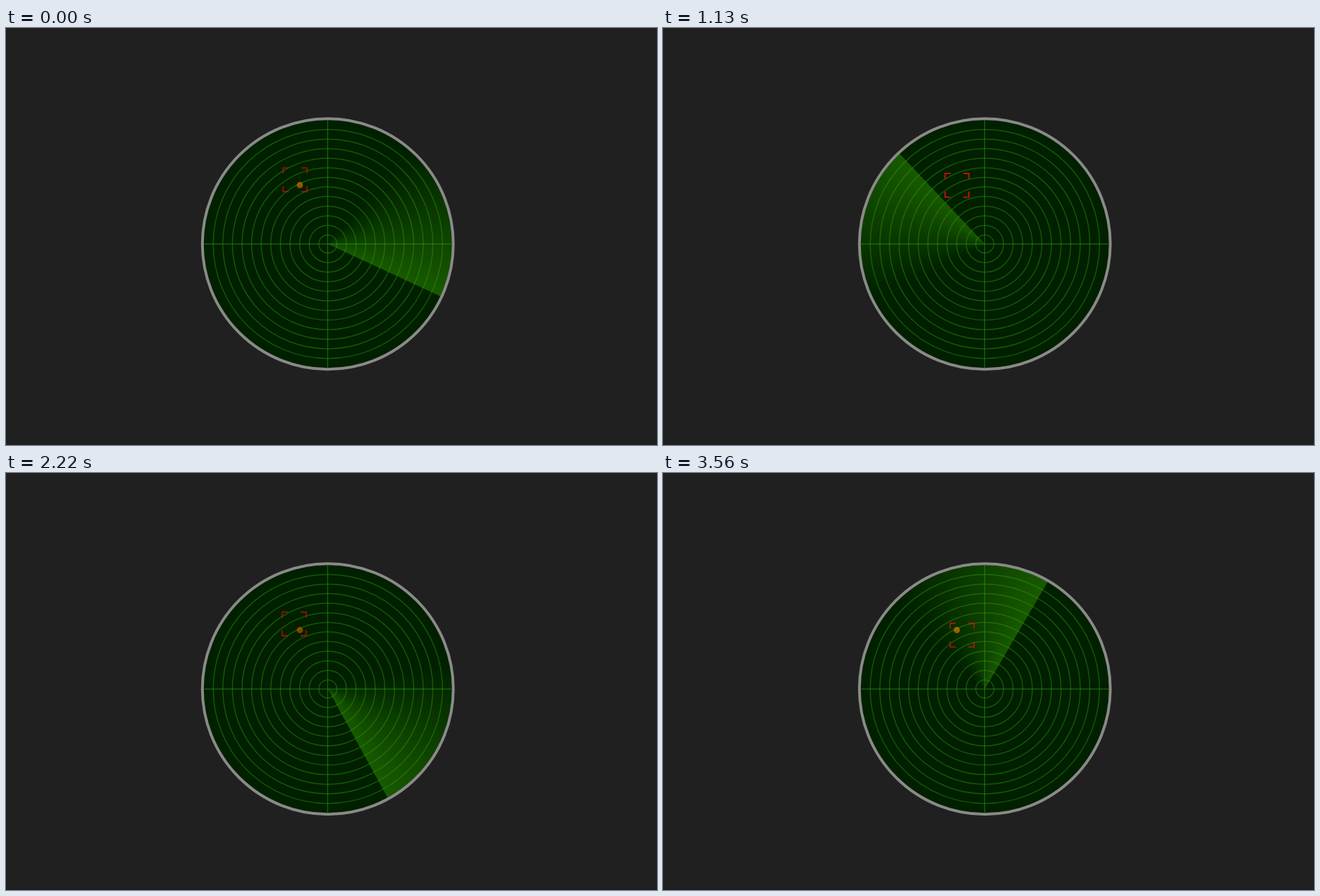
An HTML page with a canvas for the animation above (3.61 s loop, 934 by 599 pixels).

```html
<!DOCTYPE html>
<html lang="en">
<head>
<meta charset="utf-8">
<title>Radar</title>
<style>
  html, body { margin: 0; width: 100%; height: 100%; overflow: hidden; background: #202020; }
  canvas { display: block; }
</style>
</head>
<body>
<canvas id="stage" width="934" height="599"></canvas>
<script>
const ctx = document.getElementById('stage').getContext('2d');
const LOOP = 3610;
const CX = 461.75, CY = 310.2, RADIUS = 178;
const RINGS = 12, RING_START = 13, RING_GAP = 13.77;
const BLIP = { x: 421.6, y: 225.6, r: 4.5, angle: 245 };
const START_ANGLE = 24.8, DEGREES_PER_MS = 0.1785, TAIL = 74;
const RAD = Math.PI / 180;

// The bracket rests on the blip, then swings past it both ways: sweep angle, x, y.
const SWING = [
  [-57, 8, 8], [32, -8.5, -8.7], [60, -8.5, -8.7], [132, 0, -4.5],
  [215, 0, 0.4], [270, 0, 0.4], [303, 8, 8]
];

const clamp = v => Math.min(1, Math.max(0, v));

function bracketOffset(angle) {
  const a = angle > 303 ? angle - 360 : angle;
  const next = SWING.findIndex(key => key[0] >= a);
  const [a0, x0, y0] = SWING[Math.max(0, next - 1)];
  const [a1, x1, y1] = SWING[next];
  const u = clamp((a - a0) / (a1 - a0));
  return [x0 + (x1 - x0) * u, y0 + (y1 - y0) * u];
}

function circle(x, y, r) {
  ctx.beginPath();
  ctx.arc(x, y, r, 0, Math.PI * 2);
}

function line(x1, y1, x2, y2) {
  ctx.beginPath();
  ctx.moveTo(x1, y1);
  ctx.lineTo(x2, y2);
  ctx.stroke();
}

function drawSweep(angle) {
  const start = (angle - TAIL) * RAD;
  const fade = ctx.createConicGradient(start, CX, CY);
  fade.addColorStop(0, 'rgba(31,109,0,0)');
  fade.addColorStop(TAIL / 360, 'rgba(31,109,0,0.75)');
  fade.addColorStop(1, 'rgba(31,109,0,0.75)');
  ctx.fillStyle = fade;
  ctx.beginPath();
  ctx.moveTo(CX, CY);
  ctx.arc(CX, CY, RADIUS + 1, start, angle * RAD);
  ctx.fill();
}

function drawGrid() {
  ctx.strokeStyle = 'rgba(54,160,18,0.42)';
  ctx.lineWidth = 1.5;
  for (let i = 0; i < RINGS; i++) {
    circle(CX, CY, RING_START + i * RING_GAP);
    ctx.stroke();
  }
  ctx.strokeStyle = 'rgba(50,165,20,0.55)';
  ctx.lineWidth = 1.2;
  line(461.5, CY - RADIUS, 461.5, CY + RADIUS);
  line(CX - RADIUS, 310.3, CX + RADIUS, 310.3);
}

function drawBlip(angle) {
  const since = (angle - BLIP.angle + 360) % 360;
  const alpha = 0.6 * clamp(since / 10) * clamp((300 - since) / 150);
  ctx.fillStyle = `rgba(255,${140 - since * 0.2},0,${alpha})`;
  circle(BLIP.x, BLIP.y, BLIP.r);
  ctx.fill();
}

function drawBracket(angle) {
  const half = 17.1, arm = 8;
  const [dx, dy] = bracketOffset(angle);
  const x = BLIP.x + 0.2 + dx, y = BLIP.y - 0.1 + dy;
  const alpha = 0.74 + 0.15 * Math.cos((angle - 200) * RAD);
  ctx.strokeStyle = `rgba(250,12,18,${alpha})`;
  ctx.lineWidth = 1.7;
  ctx.beginPath();
  for (const sx of [-1, 1]) for (const sy of [-1, 1]) {
    const px = x + sx * half, py = y + sy * half;
    ctx.moveTo(px - sx * arm, py);
    ctx.lineTo(px, py);
    ctx.lineTo(px, py - sy * arm);
  }
  ctx.stroke();
}

function draw(time) {
  const angle = (START_ANGLE + DEGREES_PER_MS * time) % 360;

  ctx.fillStyle = '#202020';
  ctx.fillRect(0, 0, 934, 599);
  ctx.fillStyle = '#002000';
  circle(CX, CY, RADIUS + 1);
  ctx.fill();

  drawSweep(angle);
  drawGrid();
  drawBlip(angle);
  drawBracket(angle);

  ctx.strokeStyle = '#8a8a88';
  ctx.lineWidth = 4;
  circle(CX, CY, RADIUS + 2);
  ctx.stroke();
}

const origin = performance.now();
function frame() {
  draw((performance.now() - origin) % LOOP);
  requestAnimationFrame(frame);
}
frame();
</script>
</body>
</html>
```
